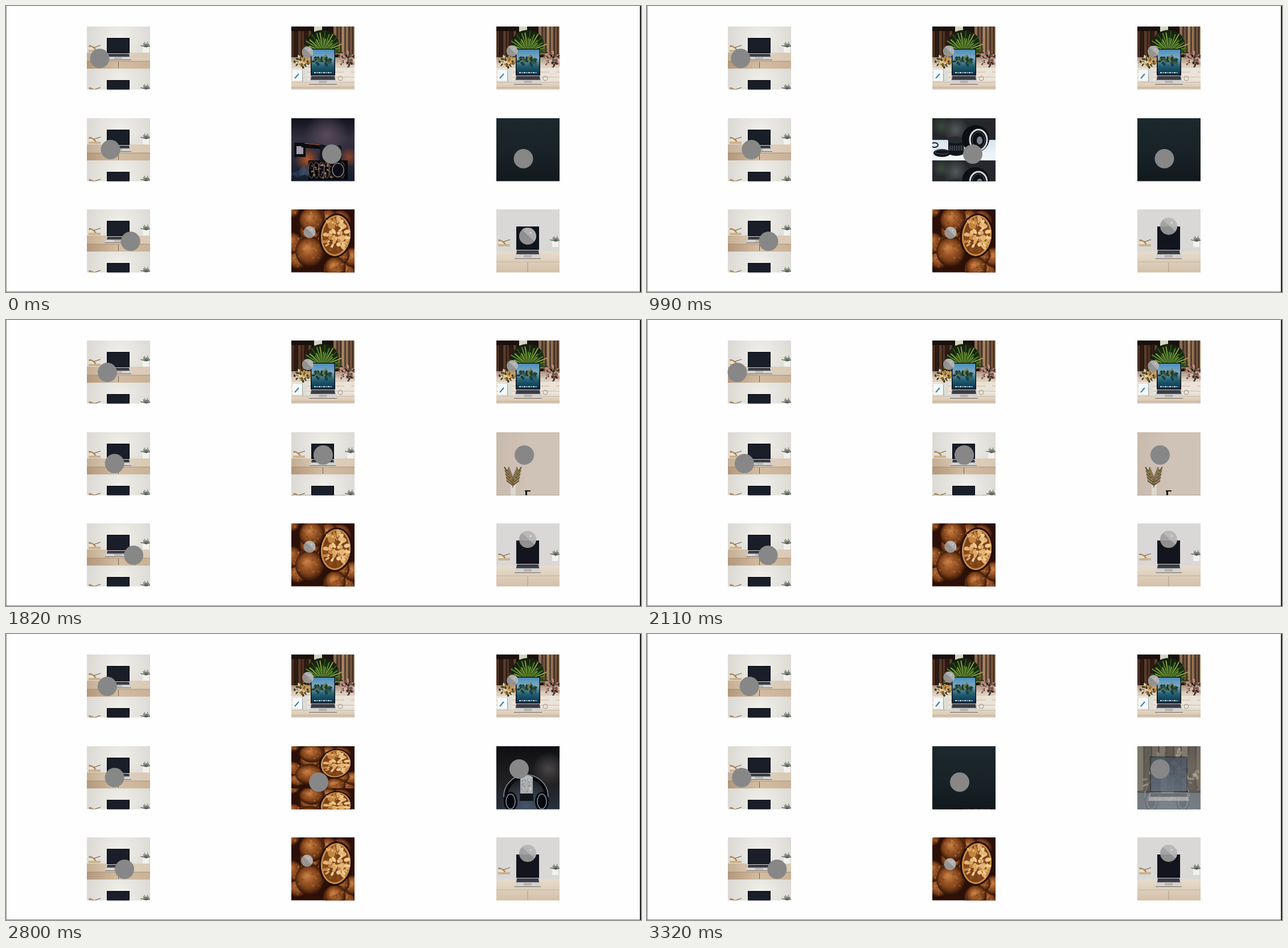
These frames come from a looping animation (1115 by 502 pixels, 3340 ms). An HTML page with a canvas:

```html
<!DOCTYPE html>
<html lang="en">
<head>
<meta charset="utf-8">
<title>Moving spots</title>
<style>
html, body { margin: 0; width: 100%; height: 100%; overflow: hidden; background: #fefefe; }
canvas { display: block; }
</style>
</head>
<body>
<canvas id="stage" width="1115" height="502"></canvas>
<script>
const g = document.getElementById('stage').getContext('2d');
const LOOP = 3340, STEP = 138.6, SIZE = 111, ROW = 74;

// Drawing helpers
function rect(c, x, y, w, h) { g.fillStyle = c; g.fillRect(x, y, w, h); }
function oval(c, x, y, rx, ry = rx, turn = 0) {
  g.fillStyle = c;
  g.beginPath();
  g.ellipse(x, y, rx, ry, turn, 0, 7);
  g.fill();
}
function ring(c, w, x, y, rx, ry = rx, from = 0, to = 2 * Math.PI) {
  g.strokeStyle = c;
  g.lineWidth = w;
  g.beginPath();
  g.ellipse(x, y, rx, ry, 0, from, to);
  g.stroke();
}
function line(c, w, x1, y1, x2, y2) {
  g.strokeStyle = c;
  g.lineWidth = w;
  g.beginPath();
  g.moveTo(x1, y1);
  g.lineTo(x2, y2);
  g.stroke();
}
function flare(c, x, y, w, topInset, h) {
  g.fillStyle = c;
  g.beginPath();
  g.moveTo(x + topInset, y);
  g.lineTo(x + w - topInset, y);
  g.lineTo(x + w, y + h);
  g.lineTo(x, y + h);
  g.fill();
}
function blend(x1, y1, x2, y2, ...colors) {
  const s = g.createLinearGradient(x1, y1, x2, y2);
  colors.forEach((c, i) => s.addColorStop(i / (colors.length - 1), c));
  return s;
}
const down = (y1, y2, ...colors) => blend(0, y1, 0, y2, ...colors);
const across = (...colors) => blend(0, 0, SIZE, 0, ...colors);
function glow(c, x, y, r) {
  const s = g.createRadialGradient(x, y, 0, x, y, r);
  s.addColorStop(0, c);
  s.addColorStop(1, c + '00');
  oval(s, x, y, r);
}

// Textures
function random(seed) {
  return () => (seed = seed * 16807 % 2147483647) / 2147483647;
}
function specks(seed, colors, n, x, y, rx, ry, size) {
  const r = random(seed);
  for (let i = 0; i < n; i++) {
    const a = r() * 7, d = Math.sqrt(r());
    oval(colors[i % colors.length], x + rx * d * Math.cos(a), y + ry * d * Math.sin(a),
      size * (0.5 + r()), size * (0.4 + r() * 0.6), a);
  }
}
function leaves(colors, x, y, n, length, spread, w) {
  for (let i = 0; i < n; i++) {
    const a = (i / (n - 1) - 0.5) * spread, l = length * (0.8 + 0.2 * Math.cos(i * 2.4));
    line(colors[i % colors.length], w, x, y, x + l * Math.sin(a), y - l * Math.cos(a));
  }
}
function planks(colors, x, y, w, h, gap) {
  for (let i = 0; i * gap < w; i++) rect(colors[i % colors.length], x + i * gap, y, gap * 0.8, h);
}

// Things that appear in several pictures
function notebook(x, y, w, h, base, screen) {
  rect('#0d1017', x, y, w, h);
  rect(screen, x + 1.5, y + 1.5, w - 3, h - 3);
  flare('#d2d1d0', x - 3, y + h, w + 6, 3, base);
  flare('#3b3d43', x, y + h + 1, w, 1, base * 0.45);
  rect('#b4b3b2', x + w / 2 - 7, y + h + base * 0.6, 14, base * 0.3);
  line('#75675a', 1, x - 3, y + h + base + 0.5, x + w + 3, y + h + base + 0.5);
}
function decor(y) {
  oval('#a88960', 10, y - 8, 8, 3, 0.6);
  oval('#ecdfca', 9, y - 6, 6, 3, 0.6);
  rect('#cdb28c', 3, y - 5, 21, 4);
  line('#775c3f', 1.2, 12, y - 9, 24, y - 13);
  rect('#f2f1ed', 98, y - 11, 11, 11);
  leaves(['#3d473f', '#667064'], 104, y - 10, 9, 10, 2.6, 1.1);
}

// Pictures
function desk() {
  rect('#d8d5d0', 0, 0, SIZE, ROW);
  glow('#f0efea', 58, 22, 70);
  rect(across('#c4ad92', '#dfd1be', '#d9c9b4'), 0, 46, SIZE, 15);
  rect(across('#b2977b', '#d3bda2', '#c9b297'), 0, 61, SIZE, 13);
  line('#9c8267', 0.8, 0, 61, SIZE, 61);
  line('#725d48', 1, 55.5, 62, 55.5, 73);
  decor(46);
  notebook(35, 20, 40, 27, 11, '#191e29');
}

function study() {
  rect('#d9d8d6', 0, 0, SIZE, SIZE);
  rect(down(74, 111, '#e6dccd', '#d3c0a8'), 0, 74, SIZE, 37);
  line('#bfa78b', 0.8, 0, 92, SIZE, 92);
  line('#a89076', 0.8, 55, 93, 55, 110);
  decor(66);
  notebook(35, 30, 40, 41, 15, '#12151d');
}

function garden() {
  rect('#1a100c', 0, 0, SIZE, 60);
  planks(['#4c3021', '#2e1c14', '#5b3c2a'], 0, 8, 34, 48, 6);
  planks(['#8c6b50', '#6d503c', '#a0805f'], 74, 0, 37, 50, 7);
  rect('#d5d4c2', 40, 0, 14, 9);
  oval('#182210', 55, 30, 28, 24);
  leaves(['#5d8e26', '#2c571c', '#9aaa49', '#173914'], 56, 44, 41, 36, 3.4, 1.8);
  rect(down(52, 111, '#a48c74', '#e9dfd2', '#eee6db', '#d2bfa8'), 0, 54, SIZE, 57);
  for (let y = 62; y < SIZE; y += 9) line('#b7a48f', 0.7, 0, y, SIZE, y);
  specks(7, ['#c98f3d', '#75602d', '#ead0a0', '#3e3c21'], 45, 17, 62, 15, 10, 2.4);
  rect('#dcddd7', 18, 74, 10, 23);
  line('#929a96', 1, 19, 75, 20, 97);
  rect('#f5f8f9', 2, 76, 17, 19);
  line('#3c7fa9', 2, 6, 91, 13, 83);
  specks(19, ['#bd8980', '#785249', '#dfbbb0', '#3c3427'], 60, 98, 58, 13, 15, 2.4);
  rect('#e9e3d9', 93, 72, 12, 16);
  ring('#88837c', 0.8, 86, 91, 4);
  notebook(34, 39, 43, 47, 15, down(41, 84, '#4c90c2', '#7fa9ba', '#245e70', '#07344e'));
  specks(11, ['#3c593e', '#183a32', '#6d7a4a', '#123f55'], 36, 55, 60, 18, 8, 3);
  planks(['#cbd8d8', '#6f9cb3'], 40, 80, 32, 2, 4);
}

function nut(x, y, r, seed) {
  const s = g.createRadialGradient(x - r * 0.2, y - r * 0.3, 0, x, y, r * 1.1);
  ['#c9834a', '#a55f2c', '#7c4019', '#2a0f06'].forEach((c, i) => s.addColorStop(i / 3, c));
  oval(s, x, y, r, r * 1.08);
  specks(seed, ['#7d431b66', '#d4935a55', '#5a2a1055'], 26, x, y, r * 0.8, r * 0.85, 2);
}
function walnuts() {
  rect('#2c1007', 0, 0, SIZE, SIZE);
  const r = random(5);
  for (let i = 0; i < 14; i++) nut(i * 43 % 118, i * 67 % 113, 14 + r() * 6, i + 3);
  nut(36, 19, 22, 31);
  nut(32, 74, 25, 37);
  nut(77, 102, 18, 41);
  oval('#220d06', 78, 46, 29, 39, 0.12);
  oval('#c88b48', 78, 46, 26, 36, 0.12);
  oval('#7c421a', 78, 46, 23, 33, 0.12);
  specks(23, ['#dda965', '#c38540', '#f0cb8f', '#e4b676', '#8a4c1e'], 85, 78, 46, 21, 31, 4);
}

function camera() {
  rect(down(0, 111, '#11131e', '#343040', '#272737', '#151c2c'), 0, 0, SIZE, SIZE);
  glow('#5a4a5a', 62, 30, 40);
  glow('#b35429', 28, 72, 22);
  glow('#8a4429', 101, 68, 18);
  specks(13, ['#40577588', '#34455f88'], 8, 18, 96, 16, 12, 6);
  rect('#0b0d12', 5, 43, 20, 25);
  rect('#a09baa', 9, 49, 12, 14);
  line('#0b0c11', 8, 18, 47, 58, 51);
  line('#a9643a', 1.2, 23, 44, 50, 47);
  rect('#15161e', 50, 48, 38, 28);
  rect('#08090e', 30, 74, 69, 34);
  specks(29, ['#c0804e', '#655e66', '#1d1a22', '#8f5c3a'], 60, 62, 90, 31, 15, 1.8);
  for (let x = 35; x < 95; x += 9) ring('#7d6658', 1, x, 91, 5, 14);
  oval('#0b0d16', 82, 91, 13, 15);
  ring('#8d7b73', 1.5, 82, 91, 10, 12);
}

function lenses() {
  rect('#25272c', 0, 0, SIZE, ROW);
  glow('#53595b', 41, 20, 23);
  glow('#3c4a3d', 16, 14, 17);
  rect(down(36, 74, '#d5e2ed', '#f5f8fb'), 0, 38, SIZE, 36);
  ring('#1b1d22', 2, 4, 47, 6, 4);
  oval('#13161b', 17, 61, 15, 7);
  ring('#555b64', 1, 17, 59, 12, 4);
  rect('#14171c', 28, 38, 28, 24);
  oval('#11141a', 42, 60, 14, 6);
  oval('#272c33', 42, 38, 15, 6);
  planks(['#484e55', '#20252b'], 30, 48, 25, 9, 2);
  oval('#0c0f14', 76, 36, 24, 24);
  ring('#d5d8da', 3, 81, 38, 15, 18);
  ring('#555b64', 1, 81, 38, 11, 14);
  oval('#77818a', 83, 39, 5, 7);
}

function dark() {
  rect(down(0, 111, '#1c282d', '#192328', '#12191d'), 0, 0, SIZE, SIZE);
}

function beige() {
  rect(across('#c9bbae', '#cfc2b6', '#cfc2b6'), 0, 0, SIZE, SIZE);
  rect('#ddd7ce', 25, 92, 9, 19);
  for (const side of [-1, 1]) {
    line('#876d44', 1, 29, 97, 29 + side * 10, 66);
    for (let i = 0; i < 9; i++) {
      const x = 29 + side * i * 1.2, y = 93 - i * 3;
      line(i % 2 ? '#a78b54' : '#4e4630', 1.8, x, y, x + side * (11 - i * 0.7), y - 8);
      line(i % 2 ? '#796540' : '#6a5839', 1.8, x, y, x - side * 3, y - 8);
    }
  }
  rect('#15130f', 50, 102, 10, 2);
  rect('#15130f', 51, 103, 3, 8);
}

function headphones() {
  rect(down(0, 111, '#0f1013', '#1f1d1f', '#27303a'), 0, 0, SIZE, SIZE);
  glow('#4a4748', 92, 40, 30);
  glow('#45566a', 52, 104, 45);
  ring('#06080c', 7, 52, 88, 36, 35, 3, 6.42);
  ring('#8496a5', 1.5, 52, 88, 39, 38, 3.1, 6.32);
  for (const x of [25, 80]) {
    oval('#06080c', x, 97, 12, 17);
    ring('#8496a5', 1.5, x, 97, 8, 13);
  }
  rect('#a9adb0', 42, 54, 22, 30);
  oval('#b8babb', 53, 55, 11, 4);
  specks(17, ['#6a7074', '#d0d3d5'], 40, 53, 69, 9, 13, 1);
  rect('#12161b', 41, 83, 24, 13);
}

function porch() {
  rect('#8d877c', 0, 0, SIZE, SIZE);
  planks(['#a39a8a', '#6f675c', '#8f8270'], 0, 0, SIZE, 78, 13);
  specks(43, ['#c0b49f', '#59544d', '#9c9a97'], 50, 55, 50, 56, 52, 4);
  rect('#8b98a6', 0, 82, SIZE, 29);
  notebook(22, 18, 66, 63, 15, down(20, 78, '#5c6c7e', '#7f92a6'));
}

// Repeats a picture of one row height down the tile
function repeat(draw, h = ROW) {
  for (let y = 0; y < SIZE; y += h) {
    g.save();
    g.translate(0, y);
    g.scale(1, h / ROW);
    g.beginPath();
    g.rect(0, 0, SIZE, ROW);
    g.clip();
    draw();
    g.restore();
  }
}
const desks = () => repeat(desk);
const lensRows = k => repeat(lenses, SIZE - (SIZE - ROW) * k);
const nutRows = () => repeat(() => { g.scale(1, ROW / SIZE); walnuts(); });

// Motion
const ramp = (t, start, length) => Math.min(1, Math.max(0, (t - start) / length));
function ease(t, start, length) {
  const k = ramp(t, start, length);
  return k * k * (3 - 2 * k);
}
const swing = (t, mid, reach, period, peak) =>
  mid + reach * Math.cos(2 * Math.PI * (t - peak) / period);

// Each slide is [picture, start, fade time]
const slides = list => t => {
  for (const [picture, start, fade] of list) {
    const k = ramp(t, start, fade);
    if (!k) continue;
    g.globalAlpha = Math.sqrt(k);
    picture(k);
  }
  g.globalAlpha = 1;
};
const middle = slides([[camera, -1, 1], [lensRows, 230, 400], [desks, 1130, 250],
  [nutRows, 2390, 270], [dark, 3050, 200]]);
const right = slides([[dark, -1, 1], [beige, 1130, 250], [headphones, 2390, 270],
  [porch, 3240, 300]]);

function spot(x, y) { oval('#878787', x, y, 17); }
function glass(x, y, r) {
  oval('rgba(157,157,157,.9)', x, y, r);
  g.save();
  g.beginPath();
  g.arc(x, y, r, 0, 7);
  g.clip();
  g.translate(x, y);
  g.rotate(0.75);
  rect('rgba(205,205,205,.5)', -r, -r, 2 * r, r * 0.9);
  g.restore();
  oval('#e8e8e8', x + r * 0.35, y - r * 0.4, r * 0.09);
}

// Pictures and spots, row by row
const TILES = [
  [desks, t => spot(swing(t, 175, 16.5, 968, 620), 92)],
  [garden, t => glass(529.3 + t / LOOP, 81 - 5.3 * t / LOOP, 10)],
  [garden, t => glass(888.5 + t / LOOP, 79 + 3 * t / LOOP, 10)],
  [desks, t => spot(swing(t, 177, 14, 968, 800), 252)],
  [middle, t => spot(
    572 - 15 * ease(t, 1130, 250) - 8 * ease(t, 2390, 270),
    260 - 23 * ease(t, 1170, 560) + 23 * ease(t, 2390, 270))],
  [right, t => spot(
    908.5 + 23.5 * ease(t, 1130, 250) - 31 * ease(t, 1520, 440),
    268 - 31 * ease(t, 1130, 250))],
  [desks, t => spot(swing(t, 216, 13.5, 1935, 1515), 413)],
  [walnuts, t => glass(
    533 - 4.5 * ease(t, 2390, 380) + 3.5 * ease(t, 2800, 500),
    397 + ease(t, 0, 1000) + 6 * ease(t, 2800, 500), 10.5)],
  [study, t => glass(916, 385 + 19 * Math.exp(-t / 400), 15)]
];

function draw(t) {
  rect('#fefefe', 0, 0, 1115, 502);
  TILES.forEach(([picture, mark], i) => {
    g.save();
    g.translate(Math.floor(142 + i % 3 * 359.5), Math.round(36.4 + Math.floor(i / 3) * 160.4));
    g.beginPath();
    g.rect(0, 0, SIZE, SIZE - 0.4);
    g.clip();
    picture(t);
    g.restore();
    mark(t);
  });
  rect('#8a8a8a', 0, 0, 1, 502);
  rect('#8a8a8a', 0, 501, 1115, 1);
  rect('#222222', 1113, 0, 2, 502);
}

// The picture advances in even steps
let shown = -1;
function frame() {
  const step = Math.floor((performance.now() % LOOP + 6) / STEP);
  if (step !== shown) draw((shown = step) * STEP);
  requestAnimationFrame(frame);
}
frame();
</script>
</body>
</html>
```
